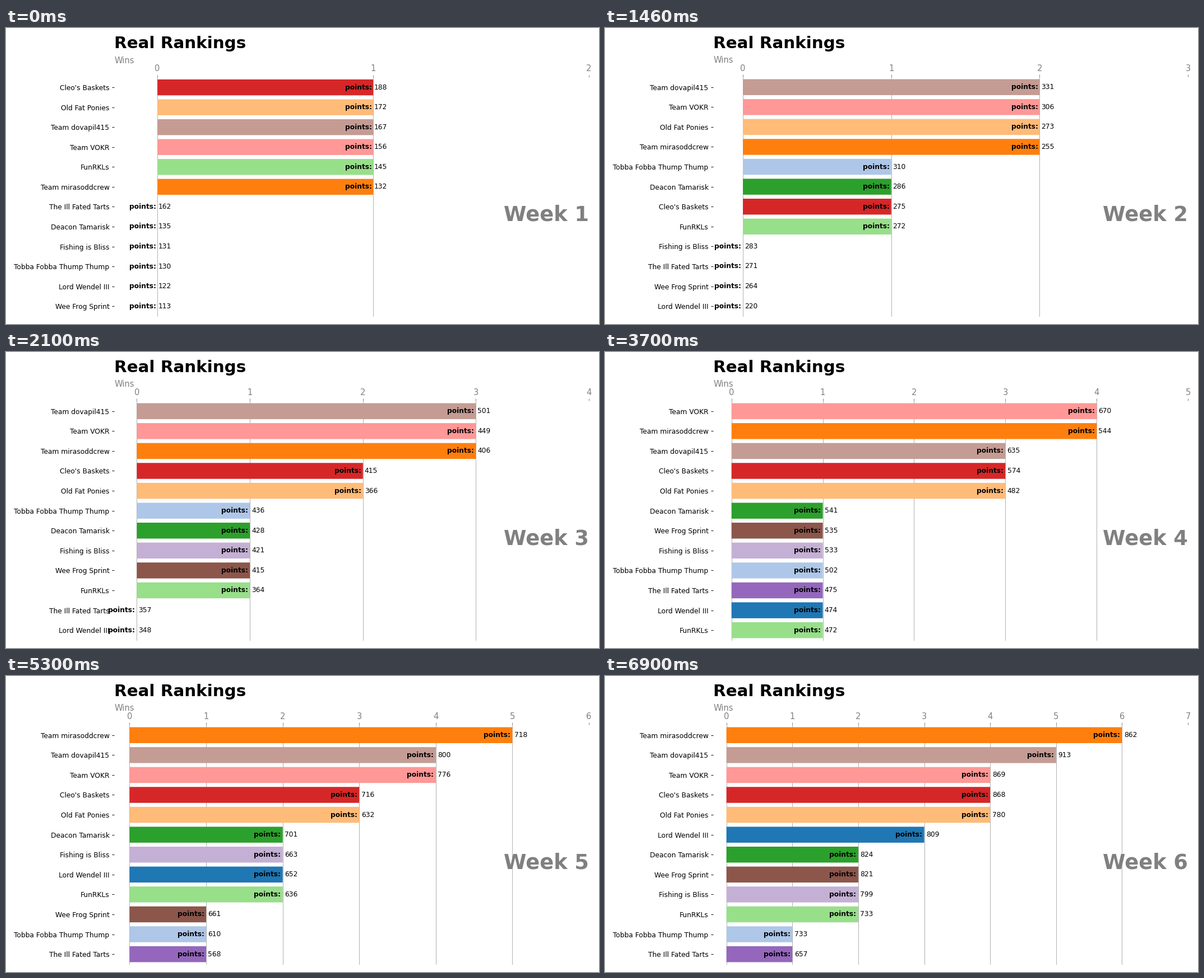
A matplotlib script that plays this animation: 1058 by 529 pixels, repeating every 8000 ms.

```python
import matplotlib.pyplot as plt
from matplotlib.animation import FuncAnimation

WIDTH, HEIGHT = 1058, 529
LEFT, RIGHT, BOTTOM = 193.1, 1040.1, 515.6  # plot edges in pixels from top left
STEP, LOOP = 100, 8000
FIRST_HOLD, HOLD = 500, 1600
WEEKS = 6
GRAY = "gray"

# Team, weekly results, running points total
TEAMS = [
    ("Lord Wendel III", "LLLWWW", (122, 220, 348, 474, 652, 809)),
    ("Tobba Fobba Thump Thump", "LWLLLL", (130, 310, 436, 502, 610, 733)),
    ("Team mirasoddcrew", "WWWWWW", (132, 255, 406, 544, 718, 862)),
    ("Old Fat Ponies", "WWLWLW", (172, 273, 366, 482, 632, 780)),
    ("Deacon Tamarisk", "LWLLWL", (135, 286, 428, 541, 701, 824)),
    ("FunRKLs", "WLLLWL", (145, 272, 364, 472, 636, 733)),
    ("Cleo's Baskets", "WLWWLW", (188, 275, 415, 574, 716, 868)),
    ("Team VOKR", "WWWWLL", (156, 306, 449, 670, 776, 869)),
    ("The Ill Fated Tarts", "LLLWLL", (162, 271, 357, 475, 568, 657)),
    ("Fishing is Bliss", "LLWLWL", (131, 283, 421, 533, 663, 799)),
    ("Wee Frog Sprint", "LLWLLW", (113, 264, 415, 535, 661, 821)),
    ("Team dovapil415", "WWWLWW", (167, 331, 501, 635, 800, 913)),
]
COLORS = plt.get_cmap("tab20").colors

plt.rcParams["font.family"] = "DejaVu Sans"
fig = plt.figure(figsize=(12, 6), dpi=WIDTH / 12, facecolor="white")


def standings(week):
    """Rows of (wins, points, name, color), best team first."""
    rows = [
        (results[:week].count("W"), points[week - 1], name, color)
        for (name, results, points), color in zip(TEAMS, COLORS)
    ]
    return sorted(rows, key=lambda row: row[:2], reverse=True)


def draw_week(week):
    top = 87.7 if week == 1 else 87.3
    ax = fig.add_axes(
        [LEFT / WIDTH, 1 - BOTTOM / HEIGHT,
         (RIGHT - LEFT) / WIDTH, (BOTTOM - top) / HEIGHT],
        label=f"week {week}",
    )
    rows = standings(week)
    lead = rows[0][0]
    gap = lead / 200

    for x in range(lead + 1):
        ax.axvline(x, color="#b0b0b0", lw=0.8, zorder=0.5)
    for y, (wins, points, _, color) in enumerate(rows):
        ax.barh(y, wins, height=0.8, color=color, snap=False)
        ax.text(wins - gap, y, "points:", size=10, weight="bold",
                ha="right", va="center")
        ax.text(wins + gap, y, str(points), size=10, ha="left", va="center")

    ax.set_xlim(-0.2, lead + 1)
    ax.set_ylim(len(rows) - 0.482, -0.518)
    ax.set_xticks(range(lead + 2))
    ax.set_yticks(range(len(rows)), [row[2] for row in rows])
    ax.xaxis.tick_top()
    ax.tick_params(axis="x", colors=GRAY, labelsize=12, pad=2.6)
    ax.tick_params(axis="y", labelsize=10)
    ax.set_frame_on(False)

    place = dict(transform=ax.transAxes)
    ax.text(0, 1.12, "Real Rankings", size=24, weight="bold", **place)
    ax.text(0, 1.058, "Wins", size=12, color=GRAY, **place)
    ax.text(1, 0.4, f"Week {week}", size=30, weight="bold", color=GRAY,
            ha="right", **place)
    return ax


charts = [draw_week(week) for week in range(1, WEEKS + 1)]


def update(frame):
    t = frame * STEP
    current = 0 if t < FIRST_HOLD else 1 + (t - FIRST_HOLD) // HOLD
    for i, ax in enumerate(charts):
        ax.set_visible(i == current)
    return charts


anim = FuncAnimation(fig, update, frames=LOOP // STEP, interval=STEP,
                     repeat=True, repeat_delay=0, blit=False)
plt.show()
```
